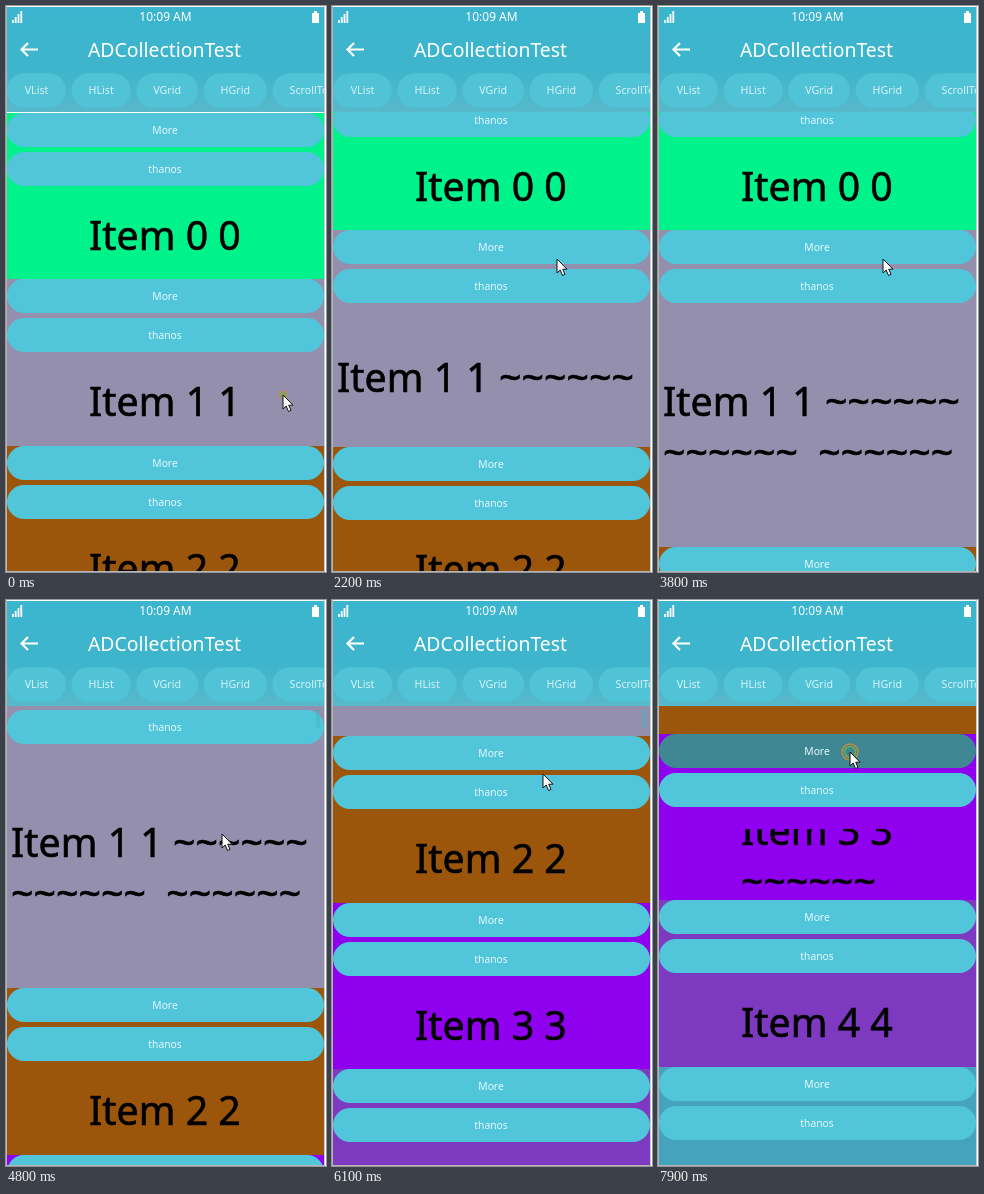
Write an HTML page with a canvas that moves like this. It is 320 by 566 pixels and loops after 8000 ms.

```html
<!DOCTYPE html>
<html lang="en">
<head>
<meta charset="utf-8">
<title>Collection list</title>
<style>
  html, body { margin: 0; width: 100%; height: 100%; overflow: hidden; background: #fff; }
  canvas { display: block; }
</style>
</head>
<body>
<canvas id="stage" width="320" height="566"></canvas>
<script>
const ctx = document.getElementById('stage').getContext('2d');
const LOOP = 8000, TOP = 106.5, ITEM = 166.7, LINE = 51, TAP = 200;
const COLORS = ['#00f38b', '#958fae', '#9c560c', '#8f00ee', '#7d3ac1', '#45a3bd'];
const TILDES = '~~~~~~';

// The pointer performs these in order and glides between them
const drag = (start, end, x, from, to) => ({ start, end, x, from, to });
const tap = (start, x, y, item) => ({ start, end: start + TAP, x, from: y, to: y, item });
const GESTURES = [
  drag(0, 600, 277, 389, 340),
  tap(1700, 225, 253, 1),
  tap(2600, 225, 253, 1),
  tap(3300, 225, 253, 1),
  drag(4300, 4750, 216, 387, 234),
  drag(5550, 6050, 211, 426, 174),
  drag(6300, 6750, 211, 352, 183),
  tap(7800, 192, 152, 3)
];

const clamp = v => Math.min(1, Math.max(0, v));
const ease = v => (v = clamp(v)) * v * (3 - 2 * v);
const mix = (a, b, p) => a + (b - a) * p;
const progress = (g, t) => ease((t - g.start) / (g.end - g.start));

function scrollAt(t) {
  return GESTURES.reduce((sum, g) => sum + (g.from - g.to) * progress(g, t), 0);
}

function pointerAt(t) {
  const i = GESTURES.findLastIndex(g => g.start <= t);
  const g = GESTURES[i], next = GESTURES[i + 1] || g;
  const glide = Math.min(400, next.start - g.end - 100);
  const p = t < g.end ? 0 : ease(1 - (next.start - t) / glide);
  const touch = t >= g.end ? 0 : g.item ? 1 : .4;
  return [mix(g.x, next.x, p), mix(mix(g.from, g.to, progress(g, t)), next.from, p), touch];
}

function rect(x, y, w, h, color) {
  ctx.fillStyle = color;
  ctx.fillRect(x, y, w, h);
}

function pill(x, y, w, h, color) {
  ctx.fillStyle = color;
  ctx.beginPath();
  ctx.roundRect(x, y, w, h, h / 2);
  ctx.fill();
}

function text(str, x, y, size, color, align = 'center', weight = 400) {
  ctx.font = `${weight} ${size}px "Noto Sans", "Open Sans", sans-serif`;
  ctx.textAlign = align;
  ctx.fillStyle = color;
  ctx.fillText(str, x, y);
}

function bigText(str, x, y) {
  text(str, x, y, 39.3, '#000', 'left');
  ctx.strokeStyle = '#000';
  ctx.lineWidth = .6;
  ctx.strokeText(str, x, y);
}

function button(label, y, down) {
  pill(1, y, 317, 34, down ? '#3f8792' : '#51c6da');
  text(label, 159, y + 20.5, 10.3, '#e6f9fc', 'center', 300);
}

function itemState(i, t) {
  const taps = GESTURES.filter(g => g.item === i && g.start <= t);
  const count = taps.length;
  const age = count ? t - taps[count - 1].start : Infinity;
  const fresh = age < TAP;
  const wide = count > 1 || count && !fresh;
  const first = `Item ${i} ${i}`;
  const lines = [wide ? first + ' ' + TILDES : first];
  if (count && !wide) lines.push(TILDES);
  if (count > 1) lines.push(Array(count - 1).fill(TILDES).join('  '));
  return {
    lines, fresh,
    x: wide ? 5 : 83,
    extra: count ? 50 * (count - 1 + ease((age - TAP / 2) / TAP)) : 0,
    clip: fresh && count < 3 ? 56 : 400
  };
}

function drawItem(i, y, s) {
  const h = ITEM + s.extra, top = Math.round(y), mid = top + 123 + s.extra / 2;
  rect(1, top, 317, h + 1, COLORS[i]);
  ctx.save();
  ctx.beginPath();
  ctx.rect(1, Math.max(top, mid - s.clip / 2), 317, Math.min(s.clip, h));
  ctx.clip();
  s.lines.forEach((line, n) =>
    bigText(line, s.x, mid + 13.5 + (n - (s.lines.length - 1) / 2) * LINE));
  ctx.restore();
  button('More', top, s.fresh);
  button('thanos', top + 39, false);
  return h;
}

function drawHeader() {
  const bg = ctx.createLinearGradient(0, 0, 0, TOP);
  bg.addColorStop(0, '#3bb5cf');
  bg.addColorStop(.6, '#3eb5cc');
  bg.addColorStop(1, '#58b9ca');
  rect(1, 1, 317, 105, bg);

  for (let i = 0; i < 4; i++) rect(6 + i * 2.8, 14 - i * 3, 1.8, 3 + i * 3, '#fff');
  rect(308, 5, 3, 2, '#fff');
  rect(306, 7, 7, 10, '#fff');
  text('10:09 AM', 159.5, 15, 12, '#fff');

  ctx.strokeStyle = '#fff';
  ctx.lineWidth = 2.2;
  ctx.stroke(new Path2D('M32 43.5H15.5M22 37l-6.5 6.5L22 50'));
  text('ADCollectionTest', 158.5, 51, 19.4, '#fff');

  let x = 1;
  for (const label of ['VList', 'HList', 'VGrid', 'HGrid', 'ScrollTo']) {
    ctx.font = '300 10.7px "Noto Sans", "Open Sans", sans-serif';
    const w = Math.max(59, ctx.measureText(label).width + 34);
    pill(x, 67.5, w, 34, '#51c3d7');
    text(label, x + w / 2, 88, 10.7, '#d8f3f8', 'center', 300);
    x += w + 5.5;
  }
}

function drawPointer(x, y, touch) {
  ctx.lineWidth = 1.5;
  [[8, '#c98a3c'], [5.5, '#6fae55']].forEach(([r, color]) => {
    if (!touch) return;
    ctx.strokeStyle = color;
    ctx.beginPath();
    ctx.arc(x, y, r * touch, 0, 7);
    ctx.stroke();
  });
  ctx.save();
  ctx.translate(x, y);
  const arrow = new Path2D('M0 0V14L3.2 11L5.5 16.5L8 15.4L5.7 10.2H10Z');
  ctx.fillStyle = '#fff';
  ctx.fill(arrow);
  ctx.strokeStyle = '#111';
  ctx.lineWidth = 1;
  ctx.stroke(arrow);
  ctx.restore();
}

function draw(now) {
  const t = Math.floor(now % LOOP / 100) * 100;
  rect(0, 0, 320, 566, '#fff');
  ctx.save();
  ctx.beginPath();
  ctx.rect(1, 1, 317, 564);
  ctx.clip();

  let y = TOP - scrollAt(t);
  COLORS.forEach((c, i) => { y += drawItem(i, y, itemState(i, t)); });

  const scrolling = GESTURES.some(g => !g.item && t > g.start && t < g.end + 500);
  if (scrolling) rect(310, 110, 4, 18, 'rgba(63, 181, 200, .5)');
  drawHeader();
  ctx.restore();

  rect(0, 0, 1, 566, '#b5b5b5');
  rect(318, 0, 1, 566, '#c8d0d2');
  rect(0, 565, 319, 1, '#b5b5b5');
  drawPointer(...pointerAt(t));
}

const start = performance.now();
function tick() {
  draw(performance.now() - start);
  requestAnimationFrame(tick);
}
tick();
</script>
</body>
</html>
```
